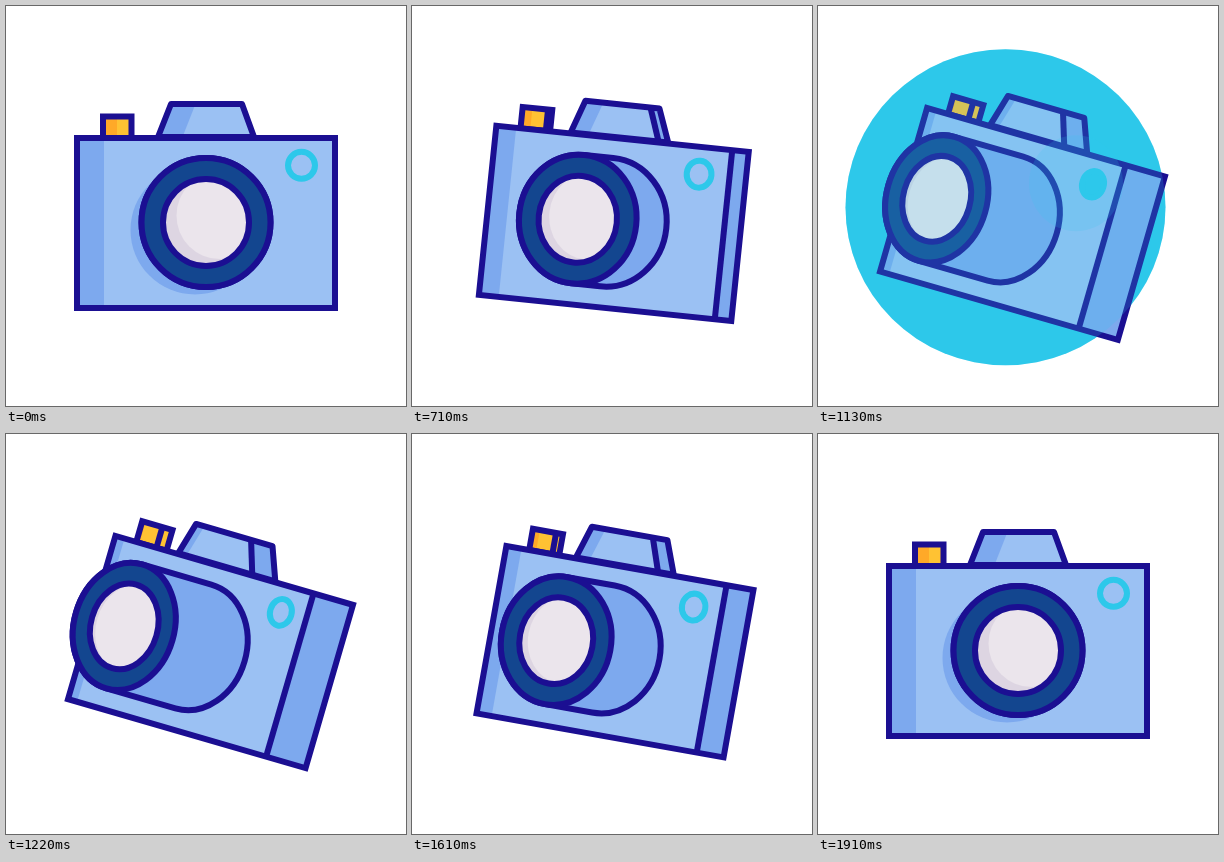
Animation, 400 px wide and 400 px high, one loop 2 s. Source, as an HTML page with a canvas:

```html
<!DOCTYPE html>
<html lang="en">
<head>
<meta charset="utf-8">
<title>Camera</title>
<style>
  html, body { margin: 0; width: 100%; height: 100%; overflow: hidden; background: #fff; }
  canvas { display: block; width: 400px; height: 400px; }
</style>
</head>
<body>
<canvas id="stage"></canvas>
<script>
const canvas = document.getElementById('stage');
const ctx = canvas.getContext('2d');
const ratio = window.devicePixelRatio || 1;
canvas.width = canvas.height = 400 * ratio;

const LOOP = 2000, START = 500, PEAK = 1205, END = 1910, FLASH = 1130;
const MAX_TURN = 16.2 * Math.PI / 180;
const INK = '#1b0f92', BODY = '#9bc1f3', SHADE = '#7da9ee', CYAN = '#2dc8ea';
const RIM = '#13468f', GLASS = '#ebe5ec', GLASS_SHADE = '#ddd5e2';
const ORANGE = '#ffa928', YELLOW = '#ffc233';

const clamp = (v) => Math.min(1, Math.max(0, v));

function bezier(x, x1, y1, x2, y2) {
  const at = (s, a, b) => 3 * (1 - s) ** 2 * s * a + 3 * (1 - s) * s * s * b + s ** 3;
  let lo = 0, hi = 1;
  for (let i = 0; i < 30; i++) {
    const mid = (lo + hi) / 2;
    if (at(mid, x1, x2) < x) lo = mid; else hi = mid;
  }
  return at(lo, y1, y2);
}

// The turn plays forward with a small wind-up, then the same way back.
function turnAt(t) {
  if (t <= START || t >= END) return 0;
  const u = (t < PEAK ? t - START : END - t) / (PEAK - START);
  return bezier(u, 0.25, -0.4, 0.2, 1);
}

const flashAt = (t) => clamp(1.3 - 1.3 * Math.abs(t - FLASH) / 90);

function paint(fill, stroke) {
  if (fill) { ctx.fillStyle = fill; ctx.fill(); }
  if (stroke) { ctx.strokeStyle = stroke; ctx.stroke(); }
}

function poly(points, fill, stroke) {
  ctx.beginPath();
  points.forEach(([x, y]) => ctx.lineTo(x, y));
  ctx.closePath();
  paint(fill, stroke);
}

function box(left, top, right, bottom, fill, stroke) {
  poly([[left, top], [right, top], [right, bottom], [left, bottom]], fill, stroke);
}

function line(x1, y1, x2, y2) {
  ctx.beginPath();
  ctx.moveTo(x1, y1);
  ctx.lineTo(x2, y2);
  paint(null, INK);
}

function oval(x, y, rx, ry, fill, stroke) {
  ctx.beginPath();
  ctx.ellipse(x, y, rx, ry, 0, 0, Math.PI * 2);
  paint(fill, stroke);
}

// The button sinks a little while the flash fires.
function drawButton(q, flash) {
  const left = -103 + q, right = -74.5 + 4 * q, edge = right - 10.5 * q;
  const top = -106.5 + 3 * flash, bottom = -85;
  box(left, top, right, bottom, YELLOW);
  box(left, top, left + 14 * (1 - 0.75 * q), bottom, ORANGE);
  if (q > 0) line(edge, top, edge, bottom);
  box(left, top, right, bottom, null, INK);
}

function drawFinder(q) {
  const top = -119, bottom = -86;
  const tl = [-35 - 14.5 * q, top], bl = [-48 - 10.5 * q, bottom];
  const tr = [36 - 6 * q, top], br = [48 - 5.5 * q, bottom];
  const et = [36 - 28.3 * q, top], eb = [48 - 29.5 * q, bottom];
  const strip = 24.5 * (1 - 0.65 * q);
  poly([tl, tr, br, bl], BODY);
  poly([tl, [tl[0] + strip, top], [bl[0] + strip, bottom], bl], SHADE);
  poly([et, tr, br, eb], SHADE);
  if (q > 0) line(...et, ...eb);
  ctx.lineJoin = 'round';
  poly([tl, tr, br, bl], null, INK);
  ctx.lineJoin = 'miter';
}

function drawBody(q) {
  const half = 129 - 5.3 * q, edge = -half + 258 - 51.7 * q;
  box(-half, -85, half, 85, BODY);
  box(-half, -85, -half + 27 * (1 - 0.65 * q), 85, SHADE);
  box(edge, -85, half, 85, SHADE);
  if (q > 0) line(edge, -85, edge, 85);
  box(-half, -85, half, 85, null, INK);
}

function drawLens(q) {
  const x = -90 * q, y = -0.5, r = 64.5, rx = r - 14.3 * q;
  const rear = -18 * q, rearRx = r - 11.2 * q;
  const drop = clamp(1 - 1.6 * q);
  oval(rear - 11 * drop, y + 7.5 * drop, rearRx, r, SHADE);

  // Barrel between the mount and the front rim
  ctx.beginPath();
  ctx.ellipse(rear, y, rearRx, r, 0, -Math.PI / 2, Math.PI / 2);
  ctx.ellipse(x, y, rx, r, 0, Math.PI / 2, Math.PI * 1.5);
  ctx.closePath();
  paint(SHADE, INK);

  oval(x, y, rx, r, RIM, INK);
  const gx = 43 * rx / r, gy = 43.5;
  oval(x, y, gx, gy, GLASS_SHADE);
  ctx.save();
  ctx.clip();
  oval(x + 13.5 - 8 * q, y - 7 * (1 - q), gx, gy, GLASS);
  ctx.restore();
  oval(x, y, gx, gy, null, INK);
}

const lampPlace = (q) => [95.5 - 39 * q, -57.7];

function drawLamp(q, flash) {
  oval(...lampPlace(q), 13.5 - 2.7 * q, 13.5, flash > 0 ? CYAN : null, CYAN);
}

function drawGlow(lamp, size, dx, dy, rx, ry, alpha) {
  ctx.globalAlpha = alpha;
  oval(lamp[0] + dx * size, lamp[1] + dy * size, rx * size, ry * size, CYAN);
  ctx.globalAlpha = 1;
}

function draw(t) {
  const p = turnAt(t), forward = Math.max(0, p), flash = flashAt(t);
  // Depth shifts run slightly ahead of the rotation.
  const q = forward * (1.17 - 0.17 * forward);
  const angle = MAX_TURN * p, cos = Math.cos(angle), sin = Math.sin(angle);
  const cx = 200 + 4.5 * q, cy = 217 + q;
  const [lx, ly] = lampPlace(q);
  const lamp = [cx + lx * cos - ly * sin, cy + lx * sin + ly * cos];

  ctx.setTransform(ratio, 0, 0, ratio, 0, 0);
  ctx.fillStyle = '#fff';
  ctx.fillRect(0, 0, 400, 400);
  ctx.lineWidth = 6;
  if (flash > 0) drawGlow(lamp, flash, -87.5, 23, 160, 158, 1);

  ctx.save();
  ctx.translate(cx, cy);
  ctx.rotate(angle);
  drawButton(q, flash);
  drawFinder(q);
  drawBody(q);
  drawLens(q);
  drawLamp(q, flash);
  ctx.restore();

  if (flash > 0) {
    drawGlow(lamp, flash, -17, -1, 47, 48, 0.16);
    drawGlow(lamp, flash, -87.5, 23, 160, 158, 0.2);
  }
}

const origin = performance.now();
function tick() {
  draw((performance.now() - origin) % LOOP);
  requestAnimationFrame(tick);
}
tick();
</script>
</body>
</html>
```
